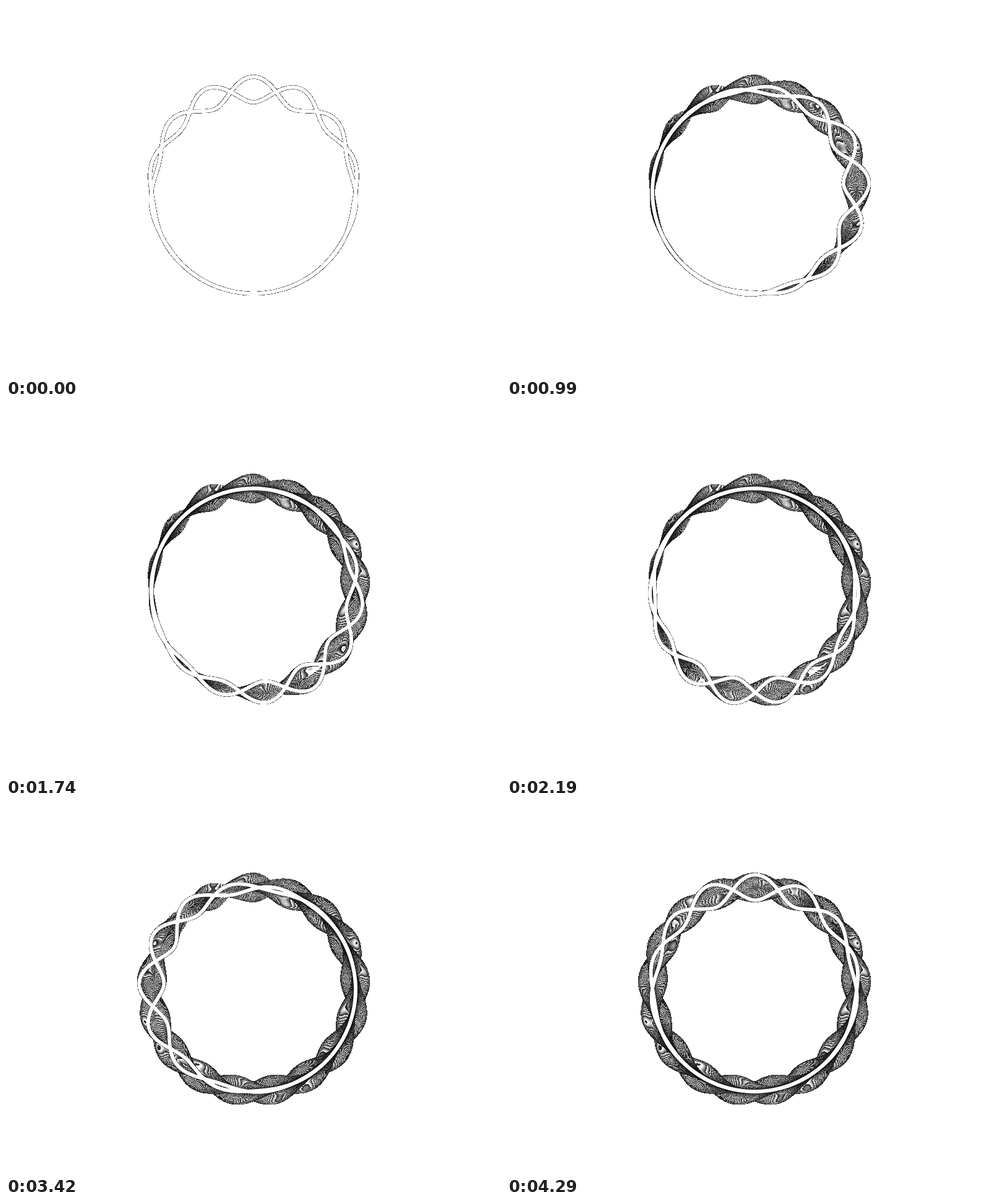
Animation, 800 px wide and 600 px high, one loop 4320 ms. Source, as an HTML page with a canvas:

```html
<!DOCTYPE html>
<html lang="en">
<head>
<meta charset="utf-8">
<title>Braided ring</title>
<style>
  html, body { margin: 0; width: 100%; height: 100%; overflow: hidden; background: #fff; }
  canvas { display: block; }
</style>
</head>
<body>
<canvas id="stage" width="800" height="600"></canvas>
<script>
const STEPS = 144, STEP_MS = 30;
const CENTER_X = 400, CENTER_Y = 300;
const RADIUS = 165, AMPLITUDE = 20.5, LINE_WIDTH = 6;
const WAVES = 7, SPREAD = 47.5 * Math.PI / 180;
const SIZE = 400, POINTS = 1440, TAU = Math.PI * 2;

const stage = document.getElementById('stage').getContext('2d');
const trail = new ImageData(SIZE, SIZE);
const brushCanvas = document.createElement('canvas');
brushCanvas.width = brushCanvas.height = SIZE;
const brush = brushCanvas.getContext('2d', { willReadFrequently: true });
brush.lineWidth = LINE_WIDTH;
brush.lineJoin = 'round';
brush.strokeStyle = '#fff';

// Radial offset of a strand; the angle runs clockwise from the top.
function swing(angle, turn) {
  const away = angle - turn * TAU;
  const distance = away - TAU * Math.round(away / TAU);
  const envelope = Math.exp(-distance * distance / (2 * SPREAD * SPREAD));
  return AMPLITUDE * envelope * Math.cos(WAVES * angle + 3 * Math.PI * turn);
}

function addStrand(turn, side) {
  for (let i = 0; i < POINTS; i++) {
    const angle = i / POINTS * TAU;
    const r = RADIUS + side * swing(angle, turn);
    const x = SIZE / 2 + r * Math.sin(angle);
    const y = SIZE / 2 - r * Math.cos(angle);
    if (i) brush.lineTo(x, y); else brush.moveTo(x, y);
  }
  brush.closePath();
}

// Partly covered edge pixels become opaque greys and stay in the trail.
function stamp(step) {
  brush.clearRect(0, 0, SIZE, SIZE);
  brush.beginPath();
  addStrand(step / STEPS, 1);
  addStrand(step / STEPS, -1);
  brush.stroke();
  const cover = brush.getImageData(0, 0, SIZE, SIZE).data;
  const out = trail.data;
  for (let i = 0; i < cover.length; i += 4) {
    const grey = cover[i + 3];
    if (grey) out[i] = out[i + 1] = out[i + 2] = grey;
  }
}

let drawn = STEPS;

function show(ms) {
  const step = Math.floor(Math.max(0, ms) / STEP_MS) % STEPS;
  if (step === drawn) return;
  if (step < drawn) {
    trail.data.fill(255);
    drawn = -1;
  }
  while (drawn < step) stamp(++drawn);
  stage.putImageData(trail, CENTER_X - SIZE / 2, CENTER_Y - SIZE / 2);
}

const start = performance.now();
function tick(now) {
  show(now - start);
  requestAnimationFrame(tick);
}
show(0);
requestAnimationFrame(tick);
</script>
</body>
</html>
```
